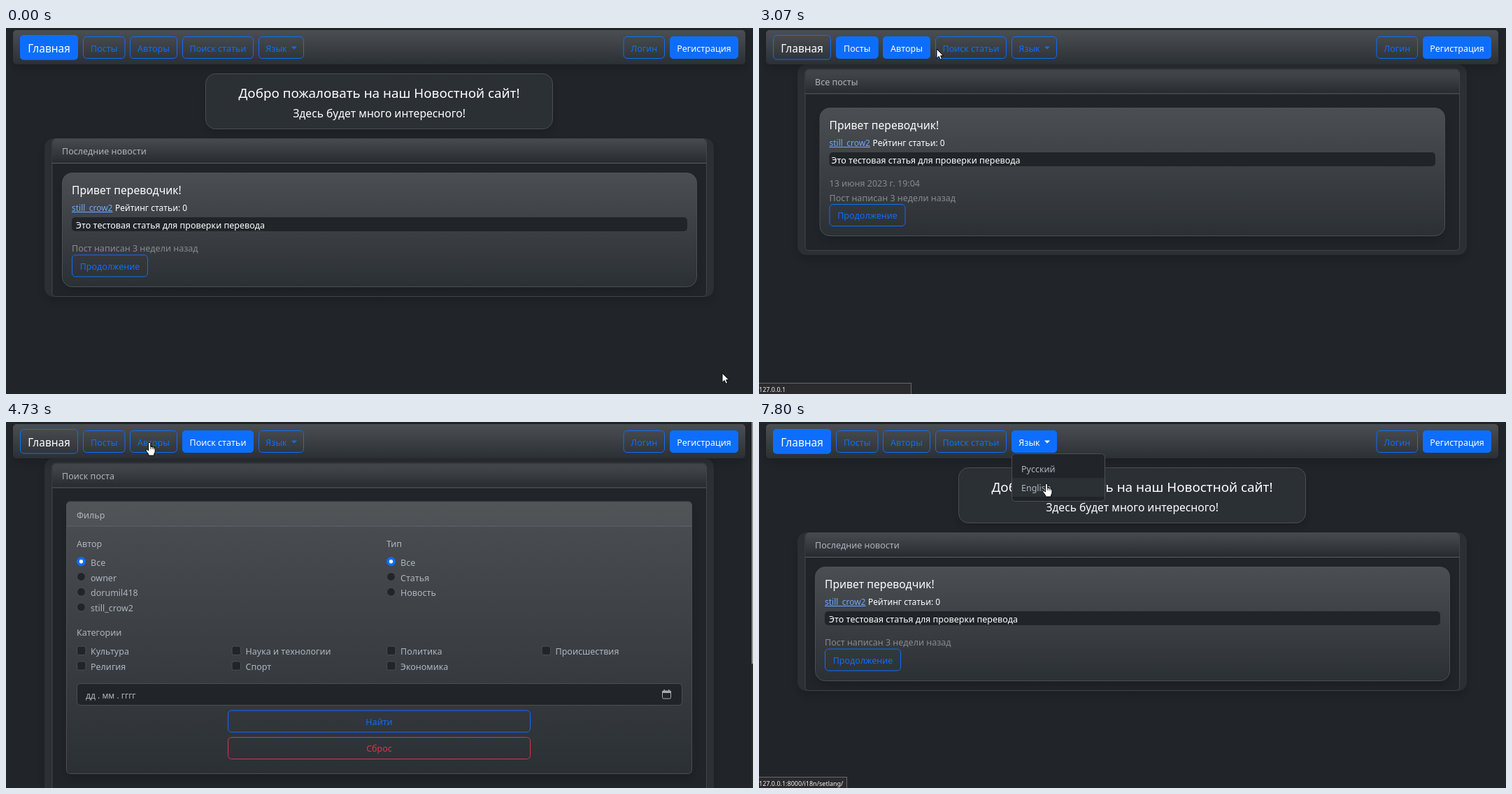
Recreate the animation shown at these times as an HTML page with a canvas. Size 1068 px wide and 524 px high, loop 8000 ms.

```html
<!DOCTYPE html>
<html lang="ru">
<head>
<meta charset="utf-8">
<title>Новостной сайт</title>
<style>
html, body { margin: 0; width: 100%; height: 100%; overflow: hidden; background: #212529; }
canvas { display: block; width: 1068px; height: 524px; }
</style>
</head>
<body>
<canvas id="stage" width="1068" height="524"></canvas>
<script>
const ctx = document.getElementById('stage').getContext('2d');
const LOOP = 8000;
const BLUE = '#0d6efd', RED = '#dc3545', BODY = '#212529', PANEL = '#2b3035';
const EDGE = '#495057', GREY = '#adb5bd', DIM = '#868b90', WHITE = '#fff';
const AUTHOR = 'still_crow2';
const BASE = 12.5;

// label, x, y, width, height
const NAV = [
  ['Главная', 20, 10, 83, 35.5],
  ['Посты', 110, 12, 60.5, 32],
  ['Авторы', 177, 12, 68, 32],
  ['Поиск статьи', 252, 12, 102, 32],
  ['Язык', 361, 12, 65, 32],
  ['Логин', 882.5, 12, 59.5, 32],
  ['Регистрация', 949, 12, 98, 32]
];

// spans in which a button is filled: [from, to]
const FILLS = {
  'Главная': [[-200, 2400], [4860, LOOP]],
  'Посты': [[1560, 3133]],
  'Авторы': [[2330, 3600]],
  'Поиск статьи': [[3070, 5733]],
  'Язык': [[6960, LOOP]],
  'Регистрация': [[-200, LOOP]]
};

// pointer tip: [time, x, y]
const PATH = [
  [0, 1024, 494], [133, 1024, 494], [533, 686, 152], [867, 686, 152],
  [1733, 140, 33], [2133, 140, 33], [2333, 174, 30], [2533, 215, 30],
  [2600, 215, 30], [2800, 228, 29], [2933, 228, 29], [3067, 254, 30],
  [3267, 300, 30], [3400, 300, 30], [3733, 303.5, 29.5], [3800, 303.5, 29.5],
  [4000, 309, 28], [4267, 309, 28], [4333, 313, 29], [4467, 313, 29],
  [5067, 54, 29], [5600, 54, 29], [6267, 973, 81], [6333, 984, 78],
  [7133, 395, 31], [7200, 395, 31], [7467, 440, 62], [7600, 489, 88], [7800, 411, 88]
];

const PAGES = [[0, home], [2400, posts], [3133, authors], [3600, search], [5733, home]];
const HOST = '127.0.0.1', URL_ROOT = HOST + ':8000/';
const STATUS = [
  [0, ''], [1867, URL_ROOT + 'posts/'], [2200, HOST], [2400, ''],
  [2733, URL_ROOT + 'authors/'], [3000, HOST], [3133, ''],
  [3467, HOST], [3867, URL_ROOT + 'search/'], [4600, ''],
  [5000, URL_ROOT], [5467, HOST], [5733, ''], [7467, URL_ROOT + 'i18n/setlang/']
];
const MENU_OPEN = 7267;

const clamp = v => Math.max(0, Math.min(1, v));
const current = (list, t) => list.filter(e => e[0] <= t + 1).pop()[1];

function text(s, x, y, size = BASE, color = WHITE, align = 'left', weight = 400) {
  ctx.font = `${weight} ${size}px "Noto Sans", "Open Sans", sans-serif`;
  ctx.textAlign = align;
  ctx.fillStyle = color;
  ctx.fillText(s, x, y);
  return ctx.measureText(s).width;
}

function box(x, y, w, h, r, fill, stroke) {
  ctx.beginPath();
  ctx.roundRect(x, y, w, h, r);
  if (fill) { ctx.fillStyle = fill; ctx.fill(); }
  if (stroke) { ctx.strokeStyle = stroke; ctx.lineWidth = 1; ctx.stroke(); }
}

function shadowed(draw) {
  ctx.save();
  ctx.shadowColor = 'rgba(0,0,0,.18)';
  ctx.shadowBlur = 13;
  ctx.shadowOffsetY = 6.7;
  draw();
  ctx.restore();
}

function shade(y, h, top = '#4b4f53', bottom = PANEL) {
  const g = ctx.createLinearGradient(0, y, 0, y + h);
  g.addColorStop(0, top);
  g.addColorStop(1, bottom);
  return g;
}

function line(x1, x2, y, color) {
  ctx.fillStyle = color;
  ctx.fillRect(x1, y, x2 - x1, 1);
}

function button(label, x, y, w, h, color = BLUE, size = BASE) {
  box(x + .5, y + .5, w - 1, h - 1, 5, null, color);
  text(label, x + w / 2, y + h / 2 + 5, size, color, 'center');
}

// outer panel with a titled card
function frame(title, top, bottom, cardTop, cardBottom) {
  shadowed(() => box(55, top, 957, bottom - top, 13, PANEL));
  box(66, cardTop, 935.5, cardBottom - cardTop, 5, BODY, '#42464a');
  box(66.5, cardTop + .5, 934.5, 34.5, [5, 5, 0, 0], shade(cardTop, 35, '#484b4f', '#272b2f'));
  line(66, 1001, cardTop + 34.5, '#5c6064');
  text(title, 80, cardTop + 22.5, BASE, GREY);
}

function article(x, y, w, h, pad, extra) {
  const left = x + 14;
  shadowed(() => box(x + .5, y + .5, w - 1, h - 1, 14, shade(y, h)));
  box(x + .5, y + .5, w - 1, h - 1, 14, null, EDGE);
  text('Привет переводчик!', left, y + 31, 15.6);
  const by = y + 54.5;
  const len = text(AUTHOR, left, by, 12, '#6ea8fe', 'left', 300);
  line(left, left + len, Math.round(by) + 1, '#6ea8fe');
  text('Рейтинг статьи: 0', left + 62, by, 12, WHITE, 'left', 300);
  box(left, y + 64, w - 28, 20, 5, BODY);
  text('Это тестовая статья для проверки перевода', left + pad, y + 79.5);
  let base = y + 113;
  if (extra) {
    text(extra, left, base, BASE, DIM);
    base += 20.5;
  }
  text('Пост написан 3 недели назад', left, base, BASE, DIM);
  button('Продолжение', left, base + 4.5, 109, 32);
}

function home() {
  shadowed(() => box(285.5, 65.5, 496, 79, 14, PANEL));
  box(285.5, 65.5, 496, 79, 14, null, EDGE);
  text('Добро пожаловать на наш Новостной сайт!', 533.5, 99.5, 18.8, WHITE, 'center');
  text('Здесь будет много интересного!', 533.5, 127.5, 15.6, WHITE, 'center');
  frame('Последние новости', 158, 385, 158.5, 384.5);
  article(80, 207, 908, 164, 6);
}

function posts() {
  frame('Все посты', 52, 325, 59, 318.5);
  article(86.5, 114, 894.5, 184, 3, '13 июня 2023 г. 19:04');
}

function scrollbar() {
  ctx.fillStyle = '#2b2b2b';
  ctx.fillRect(1066, 0, 2, 524);
  ctx.fillStyle = '#8c8c8c';
  ctx.fillRect(1066, 0, 2, 346);
}

function authors() {
  frame('Авторы', 52, 700, 59, 690);
  scrollbar();
}

function radios(title, x, names) {
  text(title, x, 179, BASE, GREY);
  names.forEach((name, i) => {
    const cy = 199.7 + i * 21.8;
    box(x + .5, cy - 6, 12, 12, 6, i ? BODY : BLUE, i ? EDGE : BLUE);
    if (!i) box(x + 3.8, cy - 2.7, 5.4, 5.4, 2.7, WHITE);
    text(name, x + 20, cy + 6, BASE, GREY);
  });
}

function checks(col, names) {
  const x = 101 + col * 221.5;
  names.forEach((name, i) => {
    const y = 321 + i * 21.8;
    box(x + .5, y, 12.5, 12.5, 3, BODY, EDGE);
    text(name, x + 20, y + 12, BASE, GREY);
  });
}

function calendar(x, y) {
  box(x + .5, y + 2, 12, 11, 1.5, null, '#a8abad');
  ctx.fillStyle = '#a8abad';
  ctx.fillRect(x, y + 2, 13, 3);
  ctx.fillRect(x + 2.5, y, 1.5, 3);
  ctx.fillRect(x + 9, y, 1.5, 3);
}

function search() {
  frame('Поиск поста', 52, 700, 59, 690);
  shadowed(() => box(86.5, 114, 894, 389.5, 5, shade(114, 390)));
  box(86.5, 114, 894, 389.5, 5, null, EDGE);
  box(87, 114.5, 893, 34, [5, 5, 0, 0], 'rgba(255,255,255,.03)');
  line(87, 981, 148.5, '#63676b');
  text('Фильр', 101, 137.5, BASE, GREY);
  radios('Автор', 101, ['Все', 'owner', 'dorumil418', AUTHOR]);
  radios('Тип', 544, ['Все', 'Статья', 'Новость']);
  text('Категории', 101, 306, BASE, GREY);
  checks(0, ['Культура', 'Религия']);
  checks(1, ['Наука и технологии', 'Спорт']);
  checks(2, ['Политика', 'Экономика']);
  checks(3, ['Происшествия']);
  box(101.5, 374.5, 865, 31, 5, BODY, EDGE);
  text('дд . мм . гггг', 114, 395.5, 12, GREY);
  calendar(938, 383);
  button('Найти', 317, 412.5, 433, 32);
  button('Сброс', 317, 451, 433, 32, RED);
  scrollbar();
}

function fillLevel(label, t) {
  const span = (FILLS[label] || []).find(([a, b]) => t >= a && t < b - 1);
  return span ? clamp((t - span[0]) / 150) : 0;
}

function caret(color) {
  ctx.fillStyle = color;
  ctx.beginPath();
  ctx.moveTo(408, 26.5);
  ctx.lineTo(416, 26.5);
  ctx.lineTo(412, 30.5);
  ctx.fill();
}

function navbar(t) {
  shadowed(() => box(10, 3, 1047, 49, 5, shade(3, 49)));
  NAV.forEach(([label, x, y, w, h], i) => {
    const cx = label === 'Язык' ? 386.5 : x + w / 2;
    const size = i ? BASE : 15.4;
    const base = i ? 33.5 : 35;
    const paint = color => {
      text(label, cx, base, size, color, 'center');
      if (label === 'Язык') caret(color);
    };
    box(x + .5, y + .5, w - 1, h - 1, 5, null, BLUE);
    paint(i ? BLUE : WHITE);
    const level = fillLevel(label, t);
    if (!level) return;
    ctx.globalAlpha = level;
    box(x, y, w, h, 5, BLUE);
    paint(WHITE);
    ctx.globalAlpha = 1;
  });
}

function menu(p) {
  box(361.5, 45.5, 133, 68, 5, BODY, EDGE);
  ['Русский', 'English'].forEach((name, i) => {
    const y = 53 + i * 27;
    if (p.y >= y && p.y < y + 27) {
      ctx.fillStyle = PANEL;
      ctx.fillRect(362, y, 132, 27);
    }
    text(name, 375, y + 19, BASE, GREY);
  });
}

function status(s) {
  if (!s) return;
  ctx.font = '9px "Noto Sans", "Open Sans", sans-serif';
  const w = s === HOST ? 218 : Math.ceil(ctx.measureText(s).width) + 5;
  ctx.fillStyle = '#68686b';
  ctx.fillRect(0, 508, w, 16);
  ctx.fillStyle = '#2b2b2d';
  ctx.fillRect(0, 509, w - 1, 15);
  text(s, 0, 521, 9, '#f2f2f2');
}

function pointerAt(t) {
  const i = PATH.findIndex(p => p[0] > t + 1);
  if (i < 0) return { x: PATH[PATH.length - 1][1], y: PATH[PATH.length - 1][2] };
  const a = PATH[i - 1], b = PATH[i];
  const k = clamp((t - a[0]) / (b[0] - a[0]));
  const e = k * k * (3 - 2 * k);
  return { x: a[1] + (b[1] - a[1]) * e, y: a[2] + (b[2] - a[2]) * e };
}

function overLink(p, open) {
  const inside = (x, y, w, h) => p.x > x + 4 && p.x < x + w - 4 && p.y > y && p.y < y + h;
  return NAV.some(n => inside(n[1], n[2], n[3], n[4])) || (open && inside(361, 53, 133, 54));
}

const ARROW = new Path2D('M0 0V13.5L3.2 10.6L5.2 15.2L7.6 14.2L5.6 9.8H9.6Z');
const HAND = new Path2D('M-1.6 1.2Q0 -.8 1.6 1.2V6.6Q3 5.6 4 7Q5.4 6.2 6.2 7.8Q7.8 7.2 8 9.2V13Q8 15 6.6 16.4V19H-1.4V17.2L-5 12.2Q-5.6 10.2 -3.6 10.2L-1.6 12Z');

function pointer(p, hand) {
  ctx.save();
  ctx.translate(p.x, p.y);
  const shape = hand ? HAND : ARROW;
  ctx.fillStyle = WHITE;
  ctx.strokeStyle = '#000';
  ctx.lineWidth = 1;
  ctx.lineJoin = 'round';
  ctx.fill(shape);
  ctx.stroke(shape);
  if (hand) {
    ctx.lineWidth = .7;
    ctx.stroke(new Path2D('M1.6 6.6V10M4 7.2V10M6.2 8V10.4'));
  }
  ctx.restore();
}

function draw(now) {
  const t = Math.floor((now % LOOP + 3.4) * .015) / .015;
  const p = pointerAt(t);
  const open = t >= MENU_OPEN - 1;
  ctx.fillStyle = BODY;
  ctx.fillRect(0, 0, 1068, 524);
  current(PAGES, t)();
  navbar(t);
  if (open) menu(p);
  status(current(STATUS, t));
  pointer(p, overLink(p, open));
}

const start = performance.now();
function tick() {
  draw(performance.now() - start);
  requestAnimationFrame(tick);
}
tick();
</script>
</body>
</html>
```
